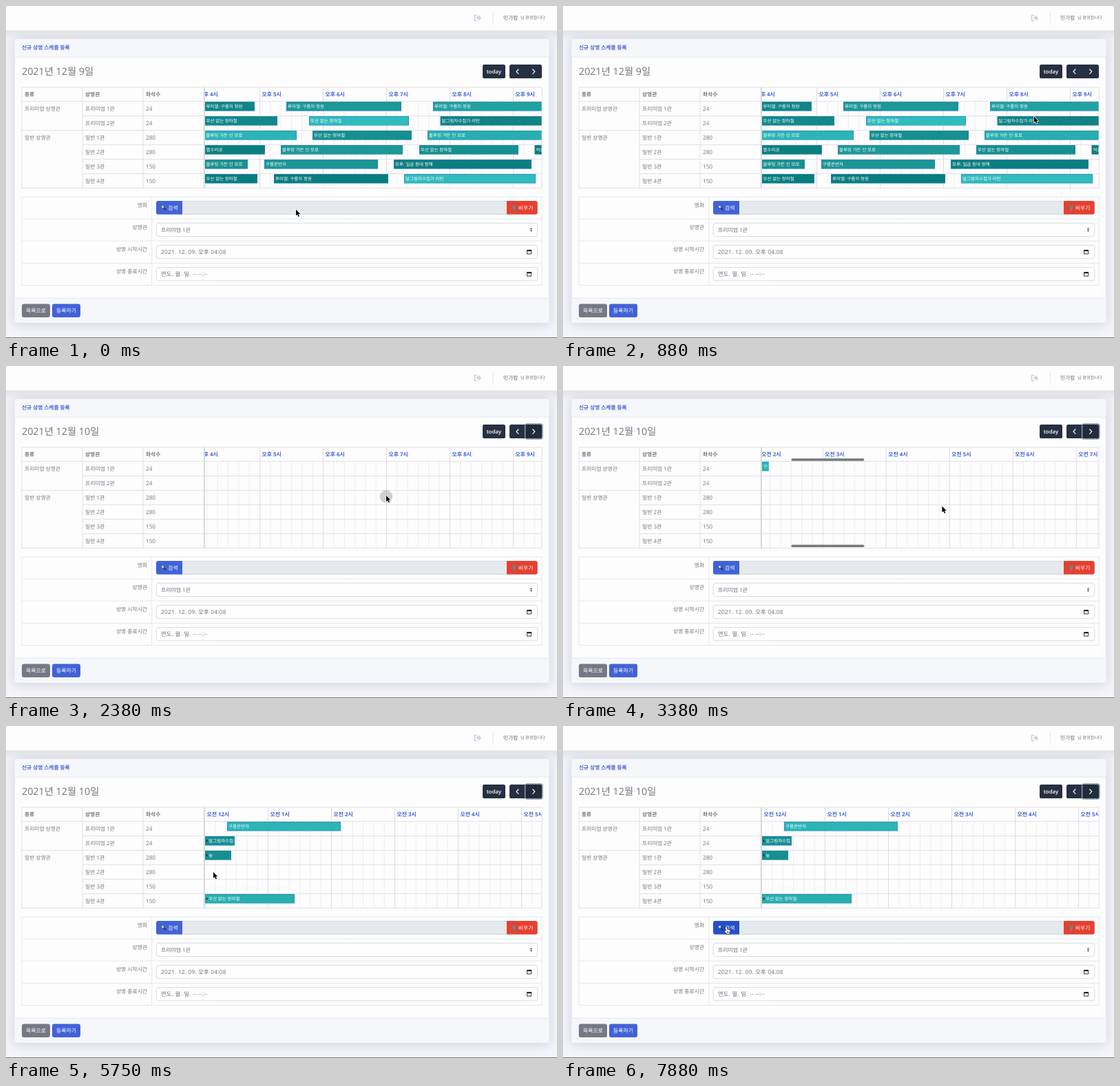
Recreate the animation shown at these times as an HTML page with a canvas. Size 800 px wide and 482 px high, loop 8 s.

```html
<!DOCTYPE html>
<html lang="ko">
<head>
<meta charset="utf-8">
<title>상영 스케줄</title>
<style>
html, body { margin: 0; width: 100%; height: 100%; overflow: hidden; background: #f4f5fa; }
canvas { display: block; width: 800px; height: 482px; }
</style>
</head>
<body>
<canvas id="stage"></canvas>
<script>
const W = 800, H = 482, LOOP = 8000;
const canvas = document.getElementById('stage');
const ratio = window.devicePixelRatio || 1;
canvas.width = W * ratio;
canvas.height = H * ratio;
const ctx = canvas.getContext('2d');
ctx.scale(ratio, ratio);
ctx.textRendering = 'geometricPrecision';

const FONT = '"Open Sans", "Noto Sans CJK KR", "Noto Sans CJK", sans-serif';
const BLUE = '#4263d5', GREY = '#74757f', LINE = '#dddee2', NAVY = '#253142';
const HOUR = 92, DAY_X = 288.5, AFTERNOON = 1484;
const ROW_Y = 138.5, ROW_H = 21;

const rooms = [['프리미엄 1관', 24], ['프리미엄 2관', 24], ['일반 1관', 280],
  ['일반 2관', 280], ['일반 3관', 150], ['일반 4관', 150]];

const film = {
  lumi: '루미엘: 구름의 정원', rain: '우산 없는 장마철', moon: '달그림자수집가 리턴',
  moro: '블루밍 가든 인 모로', star: '별수리공', cloud: '구름운반자',
  anvil: '모루: 일곱 등대 항해', marsh: '늪', brook: '여울지기'
};

// row, left, right, colour, title, continues from the day before
const firstDay = [
  [0, 270, 361, '#0f8686', film.lumi], [0, 407, 574, '#1d9797', film.lumi], [0, 620, 790, '#22a1a1', film.lumi],
  [1, 270, 394, '#118989', film.rain], [1, 440, 585, '#2fbcbe', film.rain], [1, 630.5, 790, '#108383', film.moon],
  [2, 270, 422, '#2bb5b7', film.moro], [2, 445, 589, '#149090', film.rain], [2, 612, 790, '#27afb0', film.moro],
  [3, 270, 376, '#0a7f7f', film.star], [3, 399, 576, '#1c9899', film.moro], [3, 600, 744, '#168f90', film.rain],
  [3, 767.5, 790, '#087b7b', film.brook],
  [4, 270, 351, '#199191', film.moro], [4, 375, 540, '#1b9696', film.cloud], [4, 563, 763, '#0b7f80', film.anvil],
  [5, 270, 365, '#087d7d', film.rain], [5, 389, 555, '#087d7d', film.lumi], [5, 578, 769, '#2fbcbe', film.moro.replace(film.moro, film.moon)]
];
const secondDay = [
  [0, 321, 486, '#2bb5b7', film.cloud], [1, 288.5, 332, '#159091', film.moon, true],
  [2, 288.5, 327, '#159091', film.marsh, true], [5, 288.5, 419, '#27afb0', film.rain, true]
];

const path = [[0, 421, 295.5], [375, 558.5, 262.5], [1250, 765, 94], [1875, 765, 94], [2375, 552, 188],
  [3750, 550, 207], [4250, 550, 207], [5625, 301, 212], [6375, 301, 212], [7750, 236, 291.5], [8000, 236, 291.5]];

const clamp = v => Math.max(0, Math.min(1, v));
const smooth = v => { v = clamp(v); return v * v * (3 - 2 * v); };

function text(s, x, y, size, color, weight = 400, align = 'left', gap = 0) {
  ctx.font = `${weight} ${size}px ${FONT}`;
  ctx.letterSpacing = gap + 'px';
  ctx.textAlign = align;
  ctx.textBaseline = 'alphabetic';
  ctx.fillStyle = color;
  ctx.fillText(s, x, y + size * 0.36);
}

function rect(x, y, w, h, fill) {
  ctx.fillStyle = fill;
  ctx.fillRect(x, y, w, h);
}

function box(x, y, w, h, r, fill, stroke) {
  ctx.beginPath();
  ctx.roundRect(x, y, w, h, r);
  if (fill) { ctx.fillStyle = fill; ctx.fill(); }
  if (stroke) { ctx.strokeStyle = stroke; ctx.lineWidth = 0.8; ctx.stroke(); }
}

function poly(points, fill, stroke, width = 1, close = true) {
  ctx.beginPath();
  points.forEach(([x, y]) => ctx.lineTo(x, y));
  if (close) ctx.closePath();
  ctx.lineWidth = width;
  ctx.lineJoin = 'round';
  if (stroke) { ctx.strokeStyle = stroke; ctx.stroke(); }
  if (fill) { ctx.fillStyle = fill; ctx.fill(); }
}

const hLine = (x1, x2, y, c = LINE) => rect(x1, y - 0.4, x2 - x1, 0.9, c);
const vLine = (x, y1, y2, c = LINE) => rect(x - 0.4, y1, 0.9, y2 - y1, c);

function shadowed(color, blur, dy, draw) {
  ctx.save();
  ctx.shadowColor = color;
  ctx.shadowBlur = blur * ratio;
  ctx.shadowOffsetY = dy * ratio;
  draw();
  ctx.restore();
}

function drawPage() {
  rect(0, 0, W, H, '#f4f5fa');
  shadowed('rgba(58,59,69,.17)', 18, 1.5, () => rect(-20, -20, 840, 55.5, '#fdfdfe'));
  shadowed('rgba(58,59,69,.17)', 18, 1.5, () => box(12.5, 48, 776, 412, 3, '#fdfdfe', '#e1e4ee'));
  box(12.5, 48, 776, 26, [3, 3, 0, 0], '#f5f7fb');
  box(12.5, 424, 776, 36, [0, 0, 3, 3], '#f5f7fb');
  hLine(12.5, 788.5, 74, '#e1e4ee');
  hLine(12.5, 788.5, 424, '#e1e4ee');
  rect(0, 479, W, 2, '#fafafc');
  rect(0, 481, W, 1, '#77787c');

  // sign-out icon
  ctx.lineCap = 'round';
  poly([[683, 13.5], [680.5, 13.5], [680.5, 21], [683, 21]], null, '#c9ccd8', 1.4, false);
  poly([[683.5, 16], [686, 16], [686, 13.2], [690, 17.3], [686, 21.4], [686, 18.6], [683.5, 18.6]], '#c9ccd8');
  vLine(707, 8, 27.5, '#e1e3ec');
  text('민가람', 722, 17, 7.8, '#6d6e79');
  text('님 환영합니다', 747, 17, 6.2, '#777883');

  text('신규 상영 스케줄 등록', 23, 60.5, 7.7, BLUE, 700);
  box(23, 432.5, 41, 19.5, 3, '#757986');
  text('목록으로', 43.5, 442, 7.9, '#fff', 400, 'center');
  box(67, 432.5, 41, 19.5, 3, BLUE);
  text('등록하기', 87.5, 442, 7.9, '#fff', 400, 'center');
}

function drawToolbar(day, hover, focus) {
  text(`2021년 12월 ${day}일`, 23, 95, 14.3, GREY);
  box(692, 85, 33, 20, 2.6, NAVY);
  text('today', 708.5, 94.7, 7.8, '#fff', 600, 'center');
  box(731, 85, 47, 20, 2.6, NAVY);
  if (focus) {
    ctx.beginPath();
    ctx.roundRect(753.8, 84.2, 25, 21.6, 3);
    ctx.strokeStyle = '#8f98a5';
    ctx.lineWidth = 1.8;
    ctx.stroke();
  }
  if (hover || focus) box(754.5, 85, 23.5, 20, [0, 2.6, 2.6, 0], hover ? '#17212c' : '#202c3b');
  poly([[744, 92], [741, 95.2], [744, 98.4]], null, '#fff', 1.2, false);
  poly([[764.8, 92], [767.8, 95.2], [764.8, 98.4]], null, '#fff', 1.2, false);
}

function drawEvent([row, left, right, color, title, carried], shift) {
  const x = left - shift, end = right - shift;
  const y = ROW_Y + row * ROW_H + 0.5;
  if (end < DAY_X || x > 778) return;
  ctx.save();
  ctx.beginPath();
  ctx.rect(x, y, end - x, 13.6);
  ctx.clip();
  rect(x, y, end - x, 13.6, color);
  ctx.strokeStyle = 'rgba(38,128,190,.8)';
  ctx.lineWidth = 1;
  ctx.setLineDash([1.4, 0.7]);
  ctx.strokeRect(x + 0.3, y + 0.3, end - x - 0.6, 13);
  ctx.setLineDash([]);
  const tx = Math.max(x, DAY_X) + 2;
  if (carried) poly([[x + 1.5, y + 6.8], [x + 4, y + 4.6], [x + 4, y + 9]], '#173c3c');
  ctx.beginPath();
  ctx.rect(x, y, end - x - 1, 13.6);
  ctx.clip();
  text(title, carried ? tx + 3.7 : tx, y + 6.4, 6.5, '#fff', 500);
  ctx.restore();
}

function drawSchedule(day, scroll, bar) {
  text('종류', 27, 128, 7.7, GREY, 700);
  text('상영관', 115, 128, 7.7, GREY, 700);
  text('좌석수', 203, 128, 7.7, GREY, 700);
  text('프리미엄 상영관', 27, 148.8, 7.75, GREY);
  text('일반 상영관', 27, 190.8, 7.75, GREY);
  rooms.forEach(([name, seats], i) => {
    const y = ROW_Y + i * ROW_H;
    text(name, 115, y + 10.3, 7.9, GREY);
    text(seats, 203, y + 10.3, 8.2, GREY);
    hLine(i % 2 && i < 2 || i > 2 ? 111 : 23, 778, y);
  });

  ctx.save();
  ctx.beginPath();
  ctx.rect(288, 118, 490, 146.5);
  ctx.clip();
  for (let i = 0; i <= 144; i++) {
    const x = DAY_X + i * HOUR / 6 - scroll;
    if (x < 180 || x > 790) continue;
    if (i % 6) { vLine(x, ROW_Y, 264.5, '#ececef'); continue; }
    const h = i / 6;
    vLine(x, 118, 264.5, '#d8d9dd');
    if (h < 24) text(`${h < 12 ? '오전' : '오후'} ${h % 12 || 12}시`, x + 3, 128, 7.9, BLUE, 700);
  }
  if (day === 9) firstDay.forEach(e => drawEvent(e, 0));
  else secondDay.forEach(e => drawEvent(e, scroll));
  if (bar > 0) {
    ctx.globalAlpha = bar;
    const x = 290 + scroll / (24 * HOUR) * 488;
    box(x, 134.2, 106, 3.6, 1.8, '#77787b');
    box(x, 259.4, 106, 3.6, 1.8, '#77787b');
  }
  ctx.restore();

  hLine(23, 778.4, 118);
  hLine(23, 778.4, 264.3);
  [23, 111, 199, 778].forEach(x => vLine(x, 118, 264.5));
  rect(286.8, 118, 2.2, 146.5, '#d9dadd');
}

function drawDateIcon(y) {
  ctx.strokeStyle = '#222';
  ctx.lineWidth = 0.9;
  ctx.strokeRect(757, y - 2.6, 5.6, 5.6);
  rect(756.6, y - 3, 6.4, 2, '#222');
}

function drawForm(hover) {
  [277, 309, 341, 373.3, 405.3].forEach(y => hLine(23, 778.4, y, '#e3e5ed'));
  [23, 211.7, 778].forEach(x => vLine(x, 277, 405.5, '#e3e5ed'));
  ['영화', '상영관', '상영 시작시간', '상영 종료시간'].forEach((s, i) =>
    text(s, 205, 289 + i * 32.1, 7.8, GREY, 400, 'right'));

  box(218.3, 283.2, 553.4, 19.3, 3, '#e5e9ed', '#cfd3da');
  box(218, 283, 38, 19.6, [3, 0, 0, 3], hover ? '#2450cb' : BLUE);
  ctx.lineCap = 'round';
  poly([[229.5, 293.5], [231.8, 296]], null, '#252b3d', 1.5, false);
  ctx.beginPath();
  ctx.arc(227.6, 291.6, 2.3, 0, 7);
  ctx.fillStyle = '#b9d3e8';
  ctx.fill();
  ctx.strokeStyle = '#3b4354';
  ctx.lineWidth = 0.8;
  ctx.stroke();
  text('검색', 235, 292.8, 7.9, '#fff', 500);

  box(727, 283, 44.7, 19.6, [0, 3, 3, 0], '#e54030');
  poly([[735.2, 290], [740.4, 290], [739.8, 296.8], [735.8, 296.8]], '#8b7774', '#6f6865', 0.6);
  rect(734.5, 289, 6.6, 1, '#73716f');
  text('비우기', 744, 292.8, 7.7, '#fff', 500);

  [315.2, 347.4, 379.6].forEach(y => box(218.3, y, 553.4, 19.3, 3, '#fefefe', '#d1d3df'));
  text('프리미엄 1관', 225, 324.9, 7.9, '#6c6d77');
  poly([[760.8, 324.3], [762.5, 322], [764.2, 324.3]], '#444');
  poly([[760.8, 325.5], [762.5, 327.8], [764.2, 325.5]], '#444');
  text('2021. 12. 09. 오후 04:08', 225, 357, 8.3, '#6c6d77', 400, 'left', 0.23);
  text('연도. 월. 일. -- --:--', 225, 389.2, 8.3, '#6c6d77', 400, 'left', 0.23);
  drawDateIcon(357);
  drawDateIcon(389.2);
}

function drawCursor(x, y, hand, pressed) {
  if (pressed) {
    ctx.beginPath();
    ctx.arc(x, y + 1.5, 9.3, 0, 7);
    ctx.fillStyle = 'rgba(70,70,75,.25)';
    ctx.fill();
  }
  ctx.save();
  ctx.translate(x, y);
  if (hand) {
    poly([[0, 0.6], [1, 0], [2, 0.8], [2.5, 4], [4.5, 4], [6.4, 4.9], [6.8, 7], [6, 10.3], [1.8, 10.3],
      [-0.6, 7.4], [-1.6, 5.8], [-0.6, 5.3], [0.8, 6.4]], '#fff', '#111', 1.3);
    [2.4, 4, 5.4].forEach(v => vLine(v, 7, 9, '#333'));
  } else {
    poly([[0, 0], [0, 8.9], [2, 7.1], [3.5, 10.4], [5, 9.7], [3.6, 6.6], [6.3, 6.4]], '#080808', '#fff', 1.4);
  }
  ctx.restore();
}

function cursorAt(t) {
  let i = 1;
  while (i < path.length - 1 && path[i][0] < t) i++;
  const [t0, x0, y0] = path[i - 1], [t1, x1, y1] = path[i];
  const k = smooth((t - t0) / (t1 - t0));
  return [x0 + (x1 - x0) * k, y0 + (y1 - y0) * k];
}

function stepTime(t) {
  let k = Math.floor(t / 125);
  if (t < Math.round(k * 12.5) * 10) k--;
  return k * 125;
}

function draw(now) {
  const t = stepTime(now % LOOP);
  const [x, y] = cursorAt(t);
  const onNext = x >= 754 && y >= 85 && y <= 105;
  const onSearch = x >= 218 && x <= 256 && y >= 283 && y <= 302;
  const day = t < 1875 ? 9 : 10;
  const scroll = AFTERNOON * (1 - smooth((t - 2500) / 1125));
  const bar = t > 2500 ? 1 - clamp((t - 4000) / 375) : 0;

  drawPage();
  drawToolbar(day, onNext, day === 10);
  drawSchedule(day, scroll, bar);
  drawForm(onSearch);
  drawCursor(x, y, onNext || onSearch, t >= 1875 && t < 2500);
}

const start = performance.now();
function tick() {
  draw(performance.now() - start);
  requestAnimationFrame(tick);
}
tick();
</script>
</body>
</html>
```
